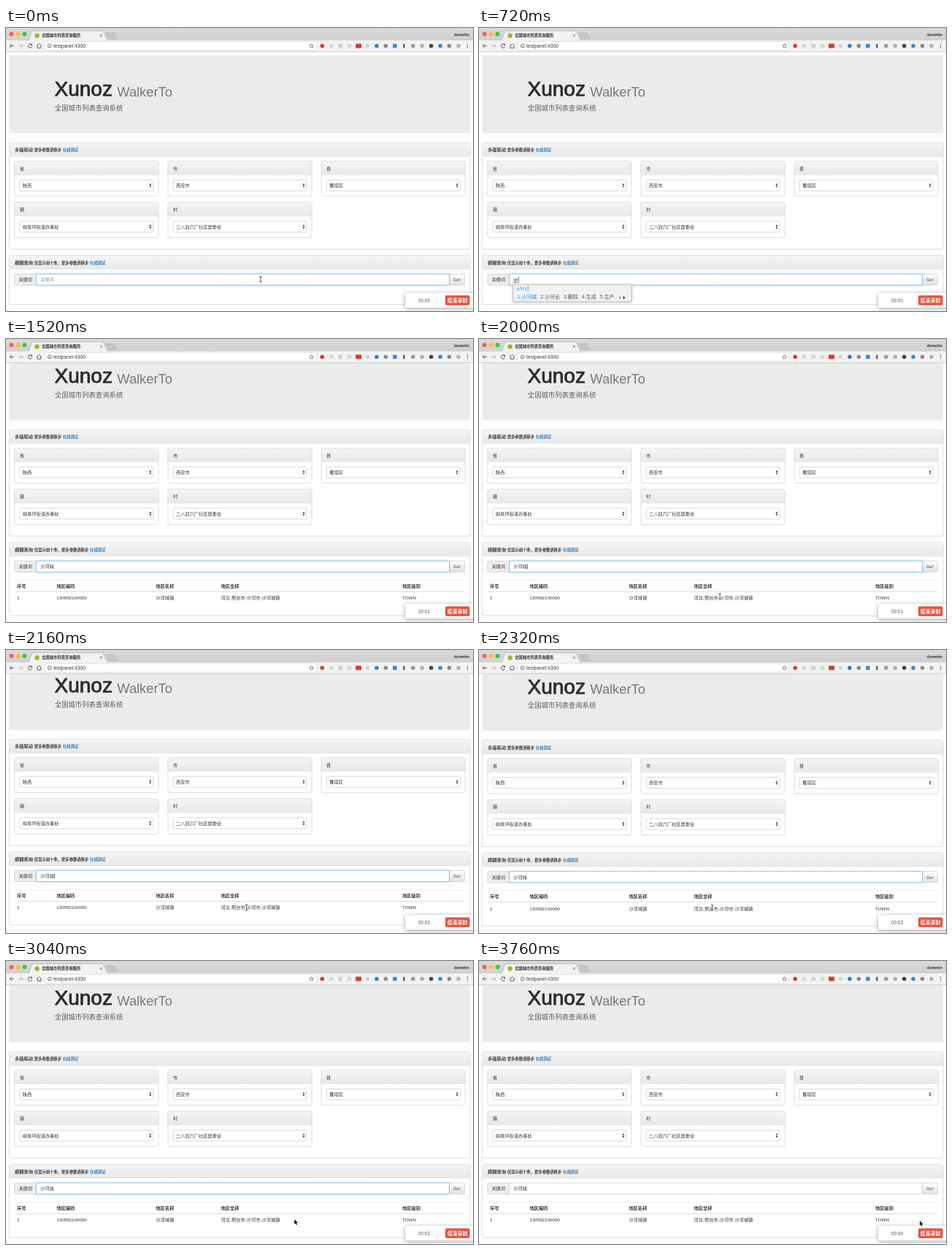
These frames come from a looping animation (640 by 388 pixels, 3.84 s). An HTML page with a canvas:

```html
<!DOCTYPE html>
<html lang="zh">
<head>
<meta charset="utf-8">
<style>
  html, body { margin: 0; width: 100%; height: 100%; overflow: hidden; background: #fdfdfd; }
  canvas { display: block; width: 640px; height: 388px; }
</style>
</head>
<body>
<canvas id="stage" width="640" height="388"></canvas>
<script>
const ctx = document.getElementById('stage').getContext('2d');
const LOOP = 3840, STEP = 80;
const FAMILY = '"Liberation Sans", "Noto Sans CJK SC", "Noto Sans CJK", sans-serif';
const BODY = 6.23, SMALL = 5.34;
const INK = '#333', LINK = '#337ab7', BORDER = '#e1e1e1';
const COMMIT = 960, RESULT = 1520, BLUR = 3200;

// Rubber-band scroll and pointer path: [ms, value, ...]
const SCROLL = [[2000, 33], [2080, 34.5], [2160, 35], [2240, 34.5], [2400, 33]];
const MOUSE = [[1760, 330, 352], [2080, 330, 353], [2240, 329, 353], [2480, 301, 354], [2640, 305, 354],
  [2960, 374, 354], [3360, 480, 355], [3680, 604, 356]];

function valueAt(keys, t, i = 1) {
  if (t <= keys[0][0]) return keys[0][i];
  for (let k = 1; k < keys.length; k++) {
    const a = keys[k - 1], b = keys[k];
    if (t <= b[0]) return a[i] + (b[i] - a[i]) * (t - a[0]) / (b[0] - a[0]);
  }
  return keys[keys.length - 1][i];
}

// Draws text centred vertically on y and returns its right edge; weight 500 gets a thin outline.
function text(str, x, y, size = BODY, color = INK, weight = 400, align = 'left') {
  const base = y + size * 0.37;
  ctx.font = `${weight} ${size}px ${FAMILY}`;
  ctx.fillStyle = ctx.strokeStyle = color;
  ctx.textAlign = align;
  ctx.fillText(str, x, base);
  if (weight === 500) {
    ctx.lineWidth = size * 0.03;
    ctx.lineJoin = 'round';
    ctx.strokeText(str, x, base);
  }
  return x + ctx.measureText(str).width;
}

function box(x, y, w, h, fill, stroke, r = 2) {
  ctx.beginPath();
  ctx.roundRect(x, y, w, h, r);
  if (fill) { ctx.fillStyle = fill; ctx.fill(); }
  if (stroke) { ctx.strokeStyle = stroke; ctx.lineWidth = 0.8; ctx.stroke(); }
}

function poly(points, fill, stroke, width = 0.9) {
  ctx.beginPath();
  points.forEach(([x, y], i) => i ? ctx.lineTo(x, y) : ctx.moveTo(x, y));
  if (fill) { ctx.closePath(); ctx.fillStyle = fill; ctx.fill(); }
  if (stroke) { ctx.strokeStyle = stroke; ctx.lineWidth = width; ctx.stroke(); }
}

function disc(x, y, r, fill, stroke) {
  ctx.beginPath();
  ctx.arc(x, y, r, 0, Math.PI * 2);
  if (fill) { ctx.fillStyle = fill; ctx.fill(); }
  if (stroke) { ctx.strokeStyle = stroke; ctx.lineWidth = 0.9; ctx.stroke(); }
}

function fade(y, h, from, to) {
  const g = ctx.createLinearGradient(0, y, 0, y + h);
  g.addColorStop(0, from);
  g.addColorStop(1, to);
  return g;
}

function withShadow(color, blur, dy, draw) {
  ctx.save();
  ctx.shadowColor = color;
  ctx.shadowBlur = blur;
  ctx.shadowOffsetY = dy;
  draw();
  ctx.restore();
}

function drawChrome() {
  ctx.fillStyle = fade(0, 17, '#dadada', '#d0d0d0');
  ctx.fillRect(0, 0, 640, 17);
  ctx.fillStyle = '#f2f2f2';
  ctx.fillRect(0, 17, 640, 16);
  ctx.fillStyle = '#c8c8c8';
  ctx.fillRect(0, 32, 640, 0.8);

  ['#fb5f57', '#fcbc30', '#32c748'].forEach((c, i) => disc(7.5 + i * 9, 8.3, 3, c));
  poly([[31, 17.5], [36, 4], [133, 4], [139, 17.5]], '#f2f2f2');
  poly([[31, 17], [36, 4], [133, 4], [139, 17]], null, '#b4b4b4', 0.7);
  poly([[137, 6.5], [148, 6.5], [152, 14.5], [141, 14.5]], '#c6c6c6', '#b0b0b0', 0.6);
  disc(42.5, 10.5, 3.2, '#a0b428');
  text('全国城市列表查询服务', 49, 10, SMALL, '#222', 500);
  poly([[128.5, 8.7], [132, 12.2]], null, '#666', 0.8);
  poly([[132, 8.7], [128.5, 12.2]], null, '#666', 0.8);
  text('dumerkin', 614, 8.8, 5.15, '#333', 500);

  // Navigation
  for (const [x, dir, c] of [[8, -1, '#555'], [20, 1, '#b5b5b5']]) {
    poly([[x - 3, 24.5], [x + 3, 24.5]], null, c);
    poly([[x, 21.7], [x + 3 * dir, 24.5], [x, 27.3]], null, c);
  }
  ctx.beginPath();
  ctx.arc(33, 24.5, 2.7, 0.4, 5.4);
  ctx.strokeStyle = '#555';
  ctx.lineWidth = 1;
  ctx.stroke();
  poly([[36, 21.2], [36, 24], [33.2, 24]], '#555');
  poly([[42, 24.7], [45.5, 21.5], [49, 24.7]], null, '#555');
  poly([[43.2, 24.2], [43.2, 27.4], [47.8, 27.4], [47.8, 24.2]], null, '#555');

  box(53, 18.6, 372, 11.8, '#fff', '#dcdcdc', 2);
  disc(59.7, 24.5, 2.5, null, '#666');
  ctx.fillStyle = '#666';
  ctx.fillRect(59.3, 24, 0.8, 2);
  text('testpanel:4300', 65, 24.3, 6.7, '#3a3a3a');
  const star = Array.from({ length: 11 }, (_, i) => {
    const a = -Math.PI / 2 + i * Math.PI / 5, r = i % 2 ? 1.4 : 3.2;
    return [418.7 + r * Math.cos(a), 24.7 + r * Math.sin(a)];
  });
  poly(star, null, '#666', 0.7);

  const tools = ['#d8392f', '#d6d6d6', '#d0d0d0', '#d6d6d6', '#d93a35', '#cfd3d6', '#3b78d0', '#8a8a8a',
    '#3f87e0', '#444', '#999', '#a9b98a', '#444', '#3d86cc', '#8c8c8c', '#b4b4b4'];
  tools.forEach((c, i) => {
    const x = 433.3 + i * 12.45;
    if (i === 4) box(x - 4, 21.5, 8, 6, c, null, 1);
    else if (i === 9) box(x - 1, 21.8, 2, 5.6, c, null, 0);
    else if (i === 2 || i === 3 || i === 8) box(x - 2.8, 21.7, 5.6, 5.6, c, null, 0.8);
    else disc(x, 24.5, 2.8, c);
  });
  [-2.3, 0, 2.3].forEach(d => disc(632.5, 24.5 + d, 0.7, '#555'));
}

function panel(x, y, w, h, headH) {
  withShadow('rgba(0,0,0,.06)', 1, 0.4, () => box(x, y, w, h, '#fefefe', BORDER));
  box(x, y, w, headH, fade(y, headH, '#f5f5f5', '#e8e8e8'), BORDER, [2, 2, 0, 0]);
}

function sectionTitle(title, note, y) {
  let x = text(title, 12, y, BODY, INK, 500);
  x = text(note, x + 1.8, y + 0.3, SMALL, INK, 500);
  text('在线调试', x + 1.8, y + 0.3, SMALL, LINK, 500);
}

function picker(label, value, col, row) {
  const x = 11.8 + col * 210.2, y = 182.5 + row * 56.6;
  panel(x, y, 197, 48, 18.6);
  text(label, x + 6.9, y + 9.8);
  box(x + 7, y + 25.8, 183, 15, '#fff', '#d0d0d0');
  text(value, x + 11, y + 33.4);
  const ax = x + 186, ay = y + 33.3;
  poly([[ax - 1.5, ay - 0.6], [ax, ay - 2.8], [ax + 1.5, ay - 0.6]], '#222');
  poly([[ax - 1.5, ay + 0.6], [ax, ay + 2.8], [ax + 1.5, ay + 0.6]], '#222');
}

function drawCaret(x) {
  ctx.fillStyle = '#333';
  ctx.fillRect(x + 0.3, 341.3, 0.7, 7.4);
}

function drawSearch(t) {
  const y = 337.3, h = 15.2, mid = 345, focused = t < BLUR;
  box(11.8, y, 30, h, '#eee', '#d0d0d0', [2, 0, 0, 2]);
  text('关键词', 17.4, mid);
  box(607.8, y, 20.8, h, fade(y, h, '#fff', '#e0e0e0'), '#d0d0d0', [0, 2, 2, 0]);
  text('Go!', 618, mid, BODY, INK, 400, 'center');

  if (focused) withShadow('rgba(102,175,233,.5)', 3.5, 0, () => box(41.5, y, 566, h, '#fff', null, 0));
  box(41.5, y, 566, h, '#fff', focused ? '#7dbbec' : '#d0d0d0', 0);

  if (t < 80) text('关键词', 47, mid, BODY, '#8f8f8f');
  else if (t < COMMIT) {
    const end = text(t < 480 ? 's' : t < 800 ? 'sh' : 'shc', 47, mid);
    ctx.fillStyle = INK;
    ctx.fillRect(47, 348.3, end - 47, 0.8);
    drawCaret(end);
  } else {
    const end = text('沙河城', 47, mid);
    if (focused && (t - 1040) % 800 < 400) drawCaret(end);
  }
}

function drawTable() {
  const columns = [
    [15, '序号', '1'], [69.3, '地区编码', '130582100000'], [205.3, '地区名称', '沙河城镇'],
    [294.5, '地区全称', '河北-邢台市-沙河市-沙河城镇'], [543, '地区级别', 'TOWN']
  ];
  ctx.fillStyle = '#e8e8e8';
  ctx.fillRect(11.8, 363, 617, 0.6);
  ctx.fillStyle = '#dcdcdc';
  ctx.fillRect(11.8, 379, 617, 0.9);
  for (const [x, head, cell] of columns) {
    text(head, x, 371.4, BODY, INK, 700);
    text(cell, x, 388);
  }
}

function drawPage(t) {
  const hasTable = t >= RESULT;
  ctx.save();
  ctx.beginPath();
  ctx.rect(0, 32.8, 640, 356);
  ctx.clip();
  // The page jumps to its end as soon as the result makes it longer.
  if (hasTable) ctx.translate(0, -valueAt(SCROLL, t));

  ctx.fillStyle = '#ebebeb';
  ctx.fillRect(4.5, 37.5, 631.5, 106.7);
  text('Xunoz', 66.5, 83, 28, '#2b2b2b', 500);
  text('WalkerTo', 152.3, 86.8, 18.3, '#777');
  text('全国城市列表查询系统', 66.8, 109.7, 9.35, '#5c5c5c', 300);

  panel(4.5, 157.5, 631.5, 145.5, 18.6);
  sectionTitle('多级联动', '更多参数请移步', 167);
  picker('省', '陕西', 0, 0);
  picker('市', '西安市', 1, 0);
  picker('县', '雁塔区', 2, 0);
  picker('镇', '柳泉坪街道办事处', 0, 1);
  picker('村', '二八四六厂社区居委会', 1, 1);

  panel(4.5, 312, 631.5, hasTable ? 100 : 67, 18.6);
  sectionTitle('模糊查询', '仅显示前十条，更多参数请移步', 321.5);
  drawSearch(t);
  if (hasTable) drawTable();
  ctx.restore();
}

function drawCandidates(t) {
  if (t < 160 || t >= COMMIT) return;
  const [typed, words] = t < 480 ? ['s', ['是', '说', '上', '三', '时']]
    : t < 640 ? ["s'h", ['是', '上', '说', '时', '少']]
    : ["s'h'c", ['沙河城', '沙河长', '删除', '生成', '生产']];
  const size = 7, blue = '#1f93e0';
  ctx.font = `400 ${size}px ${FAMILY}`;
  const labels = words.map((w, i) => `${i + 1}.${w}`);
  const wide = labels.reduce((sum, s) => sum + ctx.measureText(s).width + 5, 0);
  withShadow('rgba(0,0,0,.22)', 3, 0.8, () => box(46.5, 351.3, wide + 24.5, 24, '#f2f2f2', '#c4c4c4'));
  const end = text(typed, 52, 357, 7.4, blue);
  ctx.fillStyle = blue;
  ctx.fillRect(end + 0.5, 353.3, 0.7, 7.5);
  let x = 52.3;
  labels.forEach((s, i) => { x = text(s, x, 368.8, size, i ? '#555' : blue) + 5; });
  poly([[x + 3.6, 367.7], [x + 1.2, 369.7], [x + 3.6, 371.7]], '#777');
  poly([[x + 7.2, 367.3], [x + 9.8, 369.7], [x + 7.2, 372.1]], '#222');
}

function drawRecorder(t) {
  withShadow('rgba(0,0,0,.38)', 5, 1, () => box(547, 363, 97, 20.6, '#fff', null, 2));
  const seconds = t < 1280 ? 0 : Math.floor((t - 1280) / 800) + 1;
  text('00:0' + seconds, 573, 373.3, 6.3, '#555', 400, 'center');
  box(602, 366.5, 33.5, 13.5, '#e9543f', null, 2);
  text('结束录制', 618.7, 373.3, 6.8, '#fff', 700, 'center');
}

function beam(x, y) {
  for (const [color, width] of [['#fff', 1.8], ['#222', 0.8]]) {
    poly([[x, y - 3.4], [x, y + 3.4]], null, color, width);
    for (const s of [-1, 1]) poly([[x - 1.7, y + 4 * s], [x, y + 3.3 * s], [x + 1.7, y + 4 * s]], null, color, width);
  }
}

function arrow(x, y) {
  const shape = [[0, 0], [0, 6.8], [1.6, 5.4], [2.7, 7.8], [3.8, 7.3], [2.8, 5], [4.8, 4.9], [0, 0]];
  const points = shape.map(([dx, dy]) => [x + dx, y + dy]);
  poly(points, null, '#fff', 1.4);
  poly(points, '#111');
}

function drawMouse(t) {
  if (t < 80) return beam(349, 344.3);
  if (t < MOUSE[0][0]) return;
  const x = valueAt(MOUSE, t, 1), y = valueAt(MOUSE, t, 2);
  if (x < 378 || (x > 541 && x < 563)) beam(x, y);
  else arrow(x, y);
}

function render(now) {
  const t = Math.floor((now % LOOP) / STEP) * STEP;
  ctx.fillStyle = '#fdfdfd';
  ctx.fillRect(0, 0, 640, 388);
  drawPage(t);
  drawChrome();
  drawCandidates(t);
  drawRecorder(t);
  drawMouse(t);
}

const start = performance.now();
function tick() {
  render(performance.now() - start);
  requestAnimationFrame(tick);
}
tick();
</script>
</body>
</html>
```
